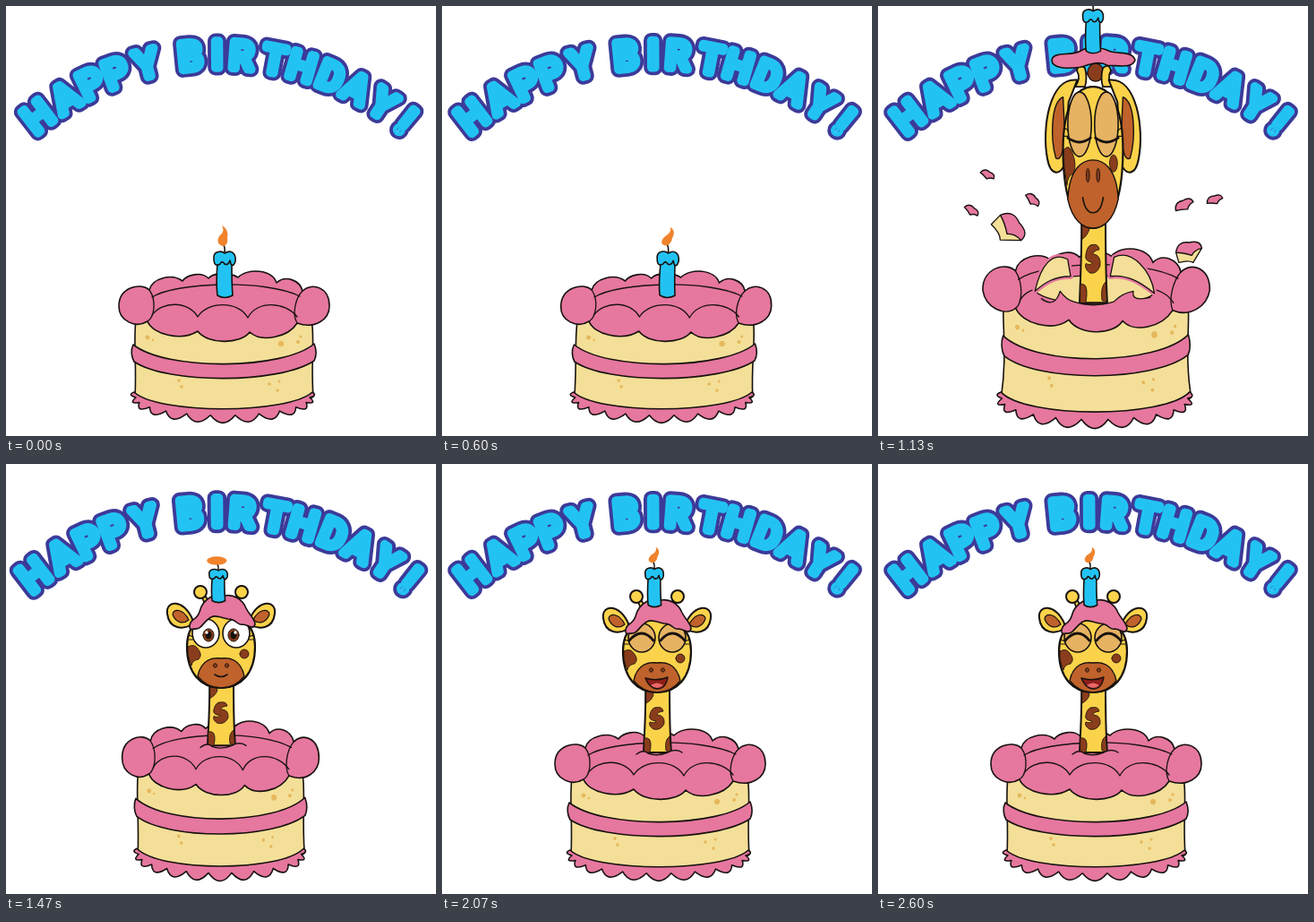
Recreate the animation shown at these times as an HTML page with a canvas. Size 480x480 px, loop 2670 ms.

```html
<!DOCTYPE html>
<html lang="en">
<head>
<meta charset="utf-8">
<title>Happy Birthday</title>
<style>
  html, body { margin: 0; width: 100%; height: 100%; overflow: hidden; background: #fff; }
  canvas { display: block; }
</style>
</head>
<body>
<canvas id="stage" width="480" height="480"></canvas>
<script>
const ctx = document.getElementById('stage').getContext('2d');
const PINK = '#e6779f', CREAM = '#f4df98', CRUMB = '#e6b85c', CYAN = '#22c3f3', NAVY = '#3c3a99',
  YELLOW = '#fbd34b', LID = '#e6b362', BROWN = '#bf622b', SPOT = '#8a3d1c', INK = '#17120f';
const LOOP = 2670, STEP = 66.67;

// Every path point passes through the current warp, so line weights stay constant.
let warp;
const place = (x, y, sx = 1, sy = sx, turn = 0) => {
  const c = Math.cos(turn), s = Math.sin(turn);
  warp = (px, py) => [x + px * sx * c - py * sy * s, y + px * sx * s + py * sy * c];
};
function draw(d, fill, line = 1.6, color = INK) {
  const path = new Path2D(d.replace(/(-?[\d.]+) (-?[\d.]+)/g,
    (_, x, y) => warp(+x, +y).map(n => n.toFixed(2)).join(' ')));
  if (fill) { ctx.fillStyle = fill; ctx.fill(path); }
  if (line) { ctx.lineWidth = line; ctx.strokeStyle = color; ctx.stroke(path); }
}
function oval(x, y, rx, ry, fill, line) {
  const a = rx * .552, b = ry * .552;
  draw(`M${x - rx} ${y}C${x - rx} ${y - b} ${x - a} ${y - ry} ${x} ${y - ry}` +
    `C${x + a} ${y - ry} ${x + rx} ${y - b} ${x + rx} ${y}C${x + rx} ${y + b} ${x + a} ${y + ry} ${x} ${y + ry}` +
    `C${x - a} ${y + ry} ${x - rx} ${y + b} ${x - rx} ${y}Z`, fill, line);
}
function mirrored(paint) {
  const base = warp;
  paint();
  warp = (x, y) => base(-x, y);
  paint();
  warp = base;
}
function track(rows, k) {
  const i = rows.findIndex(r => r[0] > k);
  if (i < 0) return rows[rows.length - 1].slice(1);
  const a = rows[i - 1], b = rows[i], u = (k - a[0]) / (b[0] - a[0]);
  return a.slice(1).map((v, j) => v + (b[j + 1] - v) * u);
}

// step, shift, lean, width, height, floor, bulge
const CAKE = [
  [0, 0, 0, 1, 1, 464, 0], [2, 4, 6, 1, 1, 464, 0], [4, 0, 0, 1, 1, 464, 0], [6, -4, -6, 1, 1, 464, 0],
  [8, 0, 0, 1, 1, 464, 0], [9, 3, 4, 1, 1, 464, 0], [10, 4, 5, 1, 1, 464, 0], [12, 1, 0, 1.1, .94, 468, .04],
  [14, 2, -6, 1.295, .8, 478, .18], [15, 0, 0, 1.33, .76, 480, .2], [16, 0, 0, 1.15, 1, 475, .03],
  [17, 0, 0, 1.08, 1.185, 470, -.06], [18, 0, 0, .97, 1.14, 466, -.03], [20, 0, 0, 1.04, .95, 464, 0],
  [22, -3, -1, .935, 1.054, 464, 0], [24, 0, 0, 1.02, .98, 464, 0], [26, 0, 0, .99, 1.01, 464, 0], [28, 0, 0, 1, 1, 464, 0]
];
// step, centre y, width, height
const HEAD = [
  [16, 250, .95, 1.3], [17, 170, .88, 1.9], [18, 165, .92, 1.5], [19, 196, 1.05, .95],
  [20, 221, 1.08, .88], [22, 209, 1, 1], [24, 217, 1, .98], [26, 213, 1, 1], [28, 214, 1, 1]
];
// x, y, size, has cake on it
const CHUNKS = [[122, 189, .9], [104, 229, .95], [172, 217, 1], [149, 247, 2, 1], [342, 223, 1.2], [376, 217, 1], [347, 272, 1.6, 1]];
const LETTER_ANGLES = [-37.6, -31.2, -25.6, -20.4, -14.2, 0, -5.6, -.4, 4.3, 10.7, 16.1, 22, 27.5, 33.4, 39];

function banner(k) {
  const s = 1 + .044 * (1 - Math.abs(k % 8 / 4 - 1));
  ctx.font = '400 42px Roboto, "Liberation Sans", sans-serif';
  ctx.textAlign = 'center';
  ctx.fillStyle = CYAN;
  for (const [color, width] of [[NAVY, 17], [CYAN, 9.5]]) {
    ctx.strokeStyle = color;
    ctx.lineWidth = width;
    [...'HAPPY BIRTHDAY!'].forEach((letter, i) => {
      ctx.save();
      ctx.translate(240, 92);
      ctx.scale(s, s);
      ctx.translate(-2, 294);
      ctx.rotate(LETTER_ANGLES[i] * Math.PI / 180);
      ctx.strokeText(letter, 0, -317);
      if (color === CYAN) ctx.fillText(letter, 0, -317);
      ctx.restore();
    });
  }
}

function cakeWarp(k) {
  const [shift, lean, sx, sy, floor, bulge] = track(CAKE, k);
  return (x, y) => {
    const h = 464 - y, swell = Math.max(0, Math.sin(Math.PI * Math.min(1, Math.max(0, (h - 20) / 110))));
    return [242 + (x - 242) * (sx + bulge * swell) + shift + lean * h / 140, floor - h * sy];
  };
}

function cake() {
  draw('M145 350C142 375 146 400 144 436C180 462 305 462 343 436C340 400 345 370 341 350Z', CREAM);
  for (const [x, y, r] of [[158, 370, 2.5], [164, 373, 1.3], [307, 377, 3.3], [326, 375, 2], [329, 369, 1.6],
    [193, 418, 1.8], [196, 425, 1.8], [294, 422, 1.8], [305, 419, 1.5], [303, 429, 1.8]]) oval(x, y, r, r, CRUMB, 0);
  draw('M142 378C139 384 140 392 143 397C180 422 305 422 344 396C347 390 346 382 344 377C310 406 180 408 142 378Z', PINK);
  let hem = 'M143 431C170 456 314 456 342 431';
  const rim = (a, rx, y, ry) => `${(242 + rx * Math.cos(a)).toFixed(1)} ${(y + ry * Math.sin(a)).toFixed(1)}`;
  for (let i = 0; i <= 11; i++)
    hem += `Q${rim((i - .5) * Math.PI / 11, 107, 440, 34)} ${rim(i * Math.PI / 11, 97, 437, 20)}`;
  draw(hem + 'Q135 434 143 431Z', PINK);
  draw('M160 317C150 308 126 314 126 335C126 352 145 360 158 352C163 366 195 375 214 363C225 378 262 378 272 364' +
    'C285 376 315 370 325 354C345 361 361 350 361 335C361 314 342 308 331 318C328 306 312 300 302 309' +
    'C297 294 270 292 259 303C250 297 232 297 226 304C218 296 202 300 197 307C185 298 163 304 160 317Z', PINK);
  draw('M163 325C190 308 290 305 328 324', null, 1.3);
  draw('M158 352C166 347 168 328 160 317M325 354C319 344 323 326 331 318', null, 1.3);
  draw('M163 345C174 329 204 329 214 347C225 329 260 329 270 348C280 328 312 330 325 347', null, 1.3);
}

function candle(x, y, size, squash, turn, k) {
  place(x, y, size, size * squash, turn);
  const wick = warp(-2, -63);
  draw('M0 -50Q1 -56 -2 -62', null, 1.6);
  draw('M-8 -40C-9 -25 -9 -10 -8 -3Q0 2 9 -3C8 -15 8 -28 8 -40Z', CYAN);
  draw('M-12 -44C-13 -53 -3 -53 0 -50C8 -55 13 -49 12 -41Q10 -34 7 -38L6 -42Q4 -36 0 -38Q-3 -43 -5 -38Q-12 -34 -12 -44Z', CYAN);
  const skew = .4 * Math.abs(Math.sin(k * Math.PI / 4));
  const flat = k > 20 && k < 24;
  place(...wick, size, size * squash);
  if (flat) return oval(0, -2, 13, 6.5, '#f0832c', 0);
  const base = warp;
  warp = (px, py) => base(px - skew * py, py * (1 - skew * .35));
  draw('M0 5C-8 3 -6 -5 -2 -8C1 -11 1 -14 -1 -18C6 -14 6 -8 5 -4C6 1 4 5 0 5Z', '#f0832c', 0);
}

function neck(top, bottom, holed) {
  warp = (x, y) => [240 + x, top + (bottom - top) * y / 72];
  draw('M-13 -6C-12 20 -14 50 -15 72L16 72C14 50 14 20 14 -6Z', YELLOW, 2);
  for (const d of ['M-12 4Q-4 2 -4 8Q-6 14 -12 17Z', 'M-14 56Q-6 54 -7 66L-8 72L-14 72Z', 'M14 54Q8 58 10 70L15 71Z',
    'M-2 22Q6 20 7 26Q0 27 0 30Q9 30 8 40Q4 48 -4 46Q-10 42 -8 38Q-2 40 -1 37Q-10 36 -8 30Q-6 22 -2 22Z'])
    draw(d, SPOT, .8);
  if (holed) return;
  place(240, bottom);
  draw('M-23 2Q-15 -4 -10 1Q0 5 12 0Q21 -5 28 0L28 7L-23 7Z', PINK, 0);
  draw('M-23 2Q-15 -4 -10 1Q0 5 12 0Q21 -5 28 0', null, 1.4);
}

function eye(mood) {
  oval(-17, -20, 15, mood === 'sleepy' ? 19 : 16, mood === 'open' ? '#fff' : LID, 1.6);
  if (mood === 'open') {
    oval(-14, -18, 6, 7, SPOT, 1);
    oval(-14, -18, 3.5, 4.5, INK, 0);
    oval(-16, -21, 1.6, 1.8, '#fff', 0);
  } else {
    draw(mood === 'sleepy' ? 'M-32 -12Q-17 -7 -3 -12' : 'M-31 -17Q-17 -33 -4 -17', null, 2.8);
  }
  draw('M-31 -16L-36 -18M-31 -13L-36 -13', null, 1.2);
}

function head(k, cy, sx, sy) {
  const stretched = k < 19, mood = stretched ? 'sleepy' : k < 26 ? 'open' : 'happy';
  const hatY = cy - 42 * sy - 30;
  if (stretched) {
    place(241, hatY);
    oval(2, 14, 9, 10, SPOT, 1.2);
    mirrored(() => draw('M-21 30Q-14 20 -19 12Q-17 3 -10 9Q-7 20 -10 30Z', YELLOW, 1.8));
  }
  place(240, cy, sx, sy);
  mirrored(() => {
    if (stretched) {
      draw('M-20 -46C-56 -48 -65 -17 -58 0C-54 11 -40 10 -36 3L-31 -33Z', YELLOW, 2);
      draw('M-38 -36C-54 -33 -54 -11 -47 0C-40 2 -36 -6 -36 -17Z', BROWN, 1.4);
    } else {
      draw('M-32 -36C-42 -59 -62 -57 -60 -42C-58 -24 -42 -24 -32 -30Z', YELLOW, 2);
      draw('M-36 -35C-42 -48 -54 -48 -54 -41C-50 -31 -42 -30 -36 -35Z', BROWN, 1.2);
      draw('M-22 -62L-15 -46L-10 -50L-19 -64Z', YELLOW, 1.8);
      oval(-23, -66, 7, 7, YELLOW, 2);
    }
  });
  draw('M-38 -5C-38 -32 -20 -42 0 -42C20 -42 38 -32 38 -5C38 25 22 41 0 41C-22 41 -38 25 -38 -5Z', YELLOW, 2.2);
  draw('M-37 -5Q-30 -9 -26 -3Q-20 4 -25 9Q-32 10 -33 16Q-38 5 -37 -5Z', SPOT, .8);
  oval(26, 3, 5, 5, SPOT, .8);
  mirrored(() => eye(mood));
  draw(stretched ? 'M-32 24C-30 5 -12 1 0 1C12 1 30 5 32 24C26 37 12 41 0 41C-12 41 -26 37 -32 24Z'
    : 'M-26 28C-22 8 -8 7 0 8C8 7 22 8 26 28C18 38 8 41 0 41C-8 41 -18 38 -26 28Z', BROWN, 1.4);
  mirrored(() => oval(-6.5, stretched ? 10 : 16, 2, stretched ? 4 : 2.2, SPOT, 1));
  if (mood === 'happy') {
    draw('M-13 25Q0 29 12 24Q10 37 0 37Q-9 36 -13 25Z', '#8e1f1a', 1.4);
    draw('M-7 33Q0 28 7 33Q0 39 -7 33Z', '#e9686a', 0);
  } else {
    draw(stretched ? 'M-13 23Q-10 32 0 32Q10 32 13 23' : 'M-7 26Q0 31 7 26', null, 1.6);
  }
  if (stretched) {
    place(241, hatY);
    draw('M-47 0C-45 -10 -26 -4 -15 -10C-5 -16 9 -14 17 -10C29 -6 43 -10 46 0C43 10 27 6 15 6C5 0 -7 6 -15 8C-29 10 -47 10 -47 0Z', PINK);
    candle(240, hatY - 7, .95, 1, 0, k);
  } else {
    draw('M-35 -26C-36 -36 -27 -34 -24 -44C-20 -60 -4 -66 4 -62C14 -64 24 -58 28 -48C32 -40 38 -36 38 -30' +
      'C36 -23 30 -30 24 -30C18 -28 18 -36 8 -36C-2 -38 -8 -42 -14 -36C-20 -32 -22 -24 -30 -25Q-34 -24 -35 -26Z', PINK);
    candle(237, cy - 54 * sy, .85, k > 20 && k < 24 ? .85 : 1, 0, k);
  }
}

function chunks(k) {
  const t = 1 + (k - 17) * .7;
  CHUNKS.forEach(([x, y, size, caked], i) => {
    place(242 + (x - 242) * t, 310 + (y - 310) * t + 40 * (t * t - t), size, size, (x < 242 ? .6 : -.9) + i * .15 + (t - 1) * 1.5);
    if (caked) draw('M-9 2L-7 9Q0 7 3 9L9 -1Z', CREAM, 1.3);
    draw('M-9 2Q-8 -6 0 -5Q8 -7 9 -1Q4 0 2 4Q-4 2 -9 2Z', PINK, 1.4);
  });
}

function render(k) {
  ctx.fillStyle = '#fff';
  ctx.fillRect(0, 0, 480, 480);
  banner(k);
  const bend = warp = cakeWarp(k);
  cake();
  if (k < 16) {
    const [, lean, , sy] = track(CAKE, k);
    return candle(...bend(244, 326), 1, Math.pow(sy, .7), lean / 140, k);
  }
  const holed = k < 19, [cy, sx, sy] = track(HEAD, k);
  if (holed) {
    draw('M180 336C186 316 300 316 304 338C290 352 196 352 180 336Z', CREAM, 1.3);
    for (const flap of ['M180 336C186 312 198 298 214 306L217 322C200 322 190 328 180 336Z',
      'M304 338C300 316 280 296 262 304L258 322C276 320 290 328 304 338Z']) {
      draw(flap, CREAM, 6, PINK);
      draw(flap, CREAM, 1.3);
    }
  }
  neck(cy + 36 * sy, bend(240, holed ? 347 : 322)[1], holed);
  if (holed) {
    warp = bend;
    draw('M186 343C196 350 202 346 206 336Q212 344 220 346Q240 352 262 346Q270 338 282 336Q280 346 300 342C290 358 200 360 186 343Z', PINK, 0);
    draw('M186 343C196 350 202 346 206 336Q212 344 220 346Q240 352 262 346Q270 338 282 336Q280 346 300 342', null, 1.3);
  }
  head(k, cy, sx, sy);
  if (k < 21) chunks(k);
}

ctx.lineJoin = ctx.lineCap = 'round';
function tick() {
  render(Math.min(39, Math.floor((performance.now() % LOOP + 5) / STEP)));
  requestAnimationFrame(tick);
}
tick();
</script>
</body>
</html>
```
